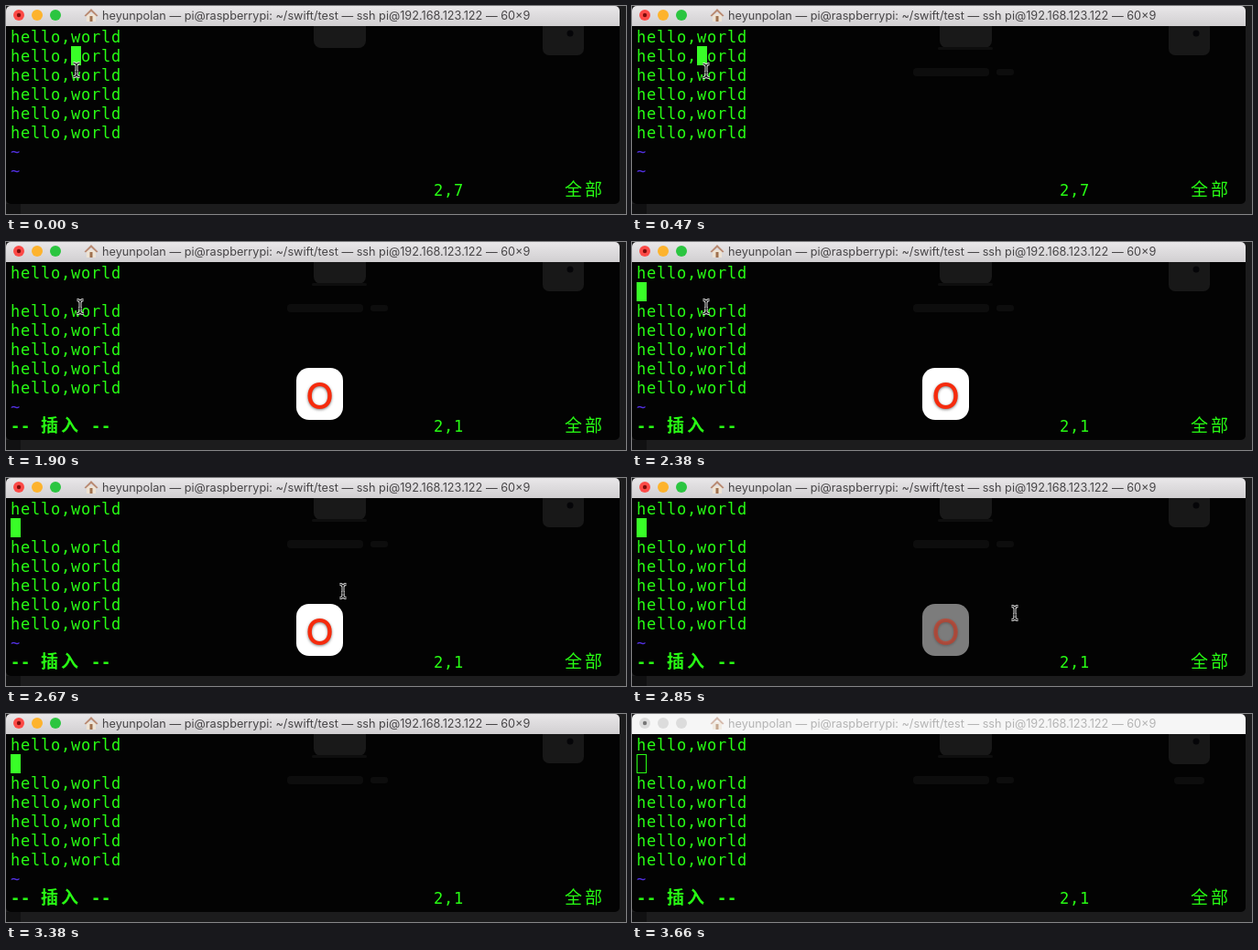
Recreate the animation shown at these times as an HTML page with a canvas. Size 677x228 px, loop 3800 ms.

```html
<!DOCTYPE html>
<html lang="en">
<head>
<meta charset="utf-8">
<title>Terminal</title>
<style>
html, body { margin: 0; width: 100%; height: 100%; overflow: hidden; background: #1c1c1d; }
canvas { display: block; }
</style>
</head>
<body>
<canvas width="677" height="228"></canvas>
<script>
const ctx = document.querySelector('canvas').getContext('2d');
const LOOP = 3800, COL = 11, ROW = 21, LEFT = 5;
const GREEN = '#28fe14', BLUE = '#5230e1';
const MONO = '17px "DejaVu Sans Mono", monospace';
const CJK = '19px "Noto Sans CJK SC", "Noto Sans CJK", sans-serif';
const TITLE = 'heyunpolan — pi@raspberrypi: ~/swift/test — ssh pi@192.168.123.122 — 60×9';

// Pointer samples: time, x, y
const POINTER = [
  [0, 77, 70], [60, 78, 70], [470, 81, 71],
  [2560, 160, 82], [2610, 295, 108], [2670, 368, 124], [2730, 390, 134],
  [2780, 405, 142], [2840, 418, 148], [2900, 425, 152], [2960, 428, 153],
  [3020, 490, 197], [3080, -50, -50]
];

function box(x, y, w, h, r, color) {
  ctx.fillStyle = color;
  ctx.beginPath();
  ctx.roundRect(x, y, w, h, r);
  ctx.fill();
}

function dot(x, y, r, color) {
  ctx.fillStyle = color;
  ctx.beginPath();
  ctx.arc(x, y, r, 0, 7);
  ctx.fill();
}

function shape(points, color) {
  ctx.fillStyle = color;
  ctx.beginPath();
  points.forEach(([x, y]) => ctx.lineTo(x, y));
  ctx.fill();
}

// Terminal text on the character grid
function put(str, col, row, color = GREEN, font = MONO, spacing = 0.77) {
  ctx.font = font;
  ctx.fillStyle = color;
  ctx.letterSpacing = spacing + 'px';
  ctx.fillText(str, LEFT + col * COL, 40 + row * ROW);
  ctx.letterSpacing = '0px';
}

function drawBackdrop(t, focused) {
  ctx.fillStyle = '#1c1c1d';
  ctx.fillRect(0, 0, 677, 228);
  box(0, 217, 16, 11, 0, '#111112');
  box(0, 0, 670, 217, [5, 5, 5, 5], '#030303');
  box(336, 20, 57, 26, [0, 0, 8, 8], '#191919');
  box(586, 20, 45, focused ? 34 : 35, [0, 0, 7, 7], '#181818');
  dot(616, 30, 3.5, '#050508');
  if (t < 60) return;
  box(334, 45, 60, 3, 2, '#0e0e0e');
  box(307, 68, 83, 9, 4, '#0d0d0d');
  box(398, 69, 19, 7, 3, '#0d0d0d');
  if (!focused) box(592, 69, 33, 8, 4, '#0d0d0d');
}

function drawTitleBar(focused) {
  const shade = ctx.createLinearGradient(0, 0, 0, 22);
  shade.addColorStop(0, focused ? '#e9e7e9' : '#f6f6f6');
  shade.addColorStop(1, focused ? '#d1cfd1' : '#f6f6f6');
  box(0, 0, 670, 22, [5, 5, 0, 0], shade);
  ['#fc4a47', '#fdb32d', '#2bc540'].forEach((color, i) =>
    dot(14 + 20 * i, 10, 6, focused ? color : '#dcdcdc'));
  dot(14, 10, 2.2, focused ? '#7d0d0b' : '#777');

  ctx.globalAlpha = focused ? 1 : 0.55;
  box(88, 9, 10, 8, 0, '#eee3d4');
  box(91.5, 11, 3, 6, 0, '#a0714f');
  shape([[85.5, 10.5], [93, 3], [100.5, 10.5], [99, 11.5], [93, 6], [87, 11.5]], '#b98a72');
  ctx.globalAlpha = 1;

  ctx.font = '12.7px Inter, sans-serif';
  ctx.fillStyle = focused ? '#474547' : '#b4b4b4';
  ctx.fillText(TITLE, 105, 15);
}

function drawTerminal(t, focused) {
  const inserting = t >= 880;
  const last = inserting ? 6 : 5;
  for (let row = 0; row < 8; row++) {
    if (inserting && row === 1) continue;
    if (row > last) put('~', 0, row, BLUE);
    else put('hello,world', 0, row);
  }
  if (inserting) {
    put('--', 0, 8, GREEN, 'bold ' + MONO);
    put('插入', 3, 8, GREEN, 'bold ' + CJK, 3);
    put('--', 8, 8, GREEN, 'bold ' + MONO);
  }
  put(inserting ? '2,1' : '2,7', 42, 8);
  put('全部', 55, 8, GREEN, CJK, 3);

  const hidden = (t >= 1900 && t < 2380) || (t >= 2900 && t < 3380);
  const x = LEFT + (inserting ? 0 : 6 * COL);
  if (!focused) {
    ctx.strokeStyle = GREEN;
    ctx.lineWidth = 1;
    ctx.strokeRect(x + 0.5, 44.5, 10, 20);
  } else if (!hidden) {
    box(x, 44, COL, ROW, 0, '#38fe27');
  }
}

function drawKey(alpha) {
  ctx.globalAlpha = alpha;
  box(317, 138, 51, 57, 14, '#fff');
  ctx.save();
  ctx.shadowColor = 'rgba(0,0,0,.5)';
  ctx.shadowBlur = 3;
  ctx.shadowOffsetY = 1;
  ctx.font = '500 40px Inter, sans-serif';
  ctx.textAlign = 'center';
  ctx.fillStyle = '#f62b0d';
  ctx.fillText('O', 342.5, 183);
  ctx.restore();
  ctx.globalAlpha = 1;
}

function drawPointer(x, y) {
  ctx.save();
  ctx.translate(x, y);
  ctx.beginPath();
  for (const s of [-1, 1]) {
    ctx.moveTo(-3.5, 7.5 * s);
    ctx.quadraticCurveTo(0, 7.5 * s, 0, 4.5 * s);
    ctx.quadraticCurveTo(0, 7.5 * s, 3.5, 7.5 * s);
  }
  ctx.moveTo(0, -5);
  ctx.lineTo(0, 5);
  ctx.moveTo(-2, 2);
  ctx.lineTo(2, 2);
  for (const [width, color] of [[3, '#e8e8e8'], [1.2, '#111']]) {
    ctx.lineWidth = width;
    ctx.strokeStyle = color;
    ctx.stroke();
  }
  ctx.restore();
}

function draw(now) {
  const t = now % LOOP;
  const focused = t < 3660;
  const [time, x, y] = POINTER.findLast(p => p[0] <= t);
  drawBackdrop(t, focused);
  drawTitleBar(focused);
  drawTerminal(t, focused);
  const alpha = Math.min(1, 1 - (time - 2680) / 307);
  if (t >= 820 && alpha > 0) drawKey(alpha);
  drawPointer(x, y);
  requestAnimationFrame(draw);
}
requestAnimationFrame(draw);
</script>
</body>
</html>
```
